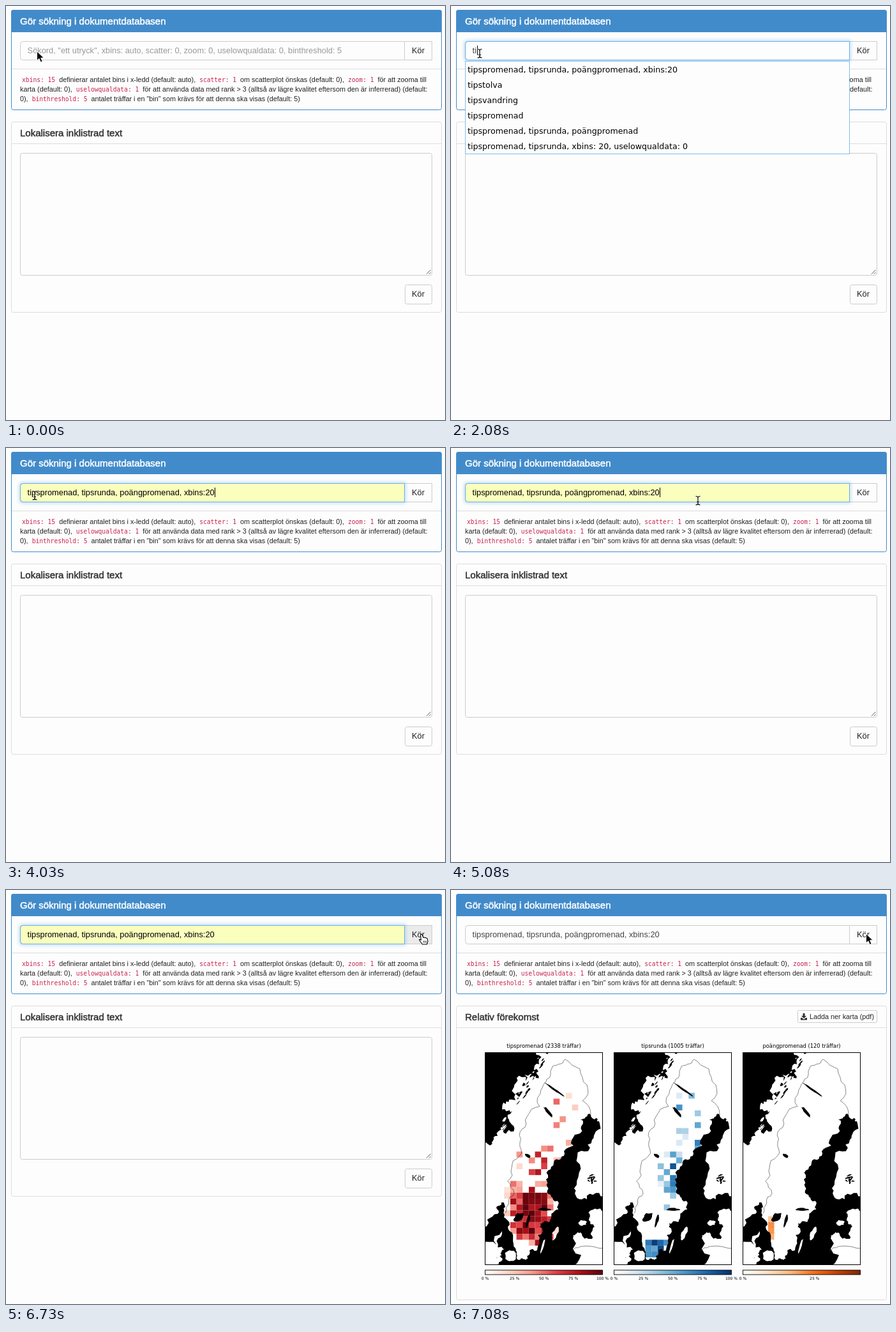
An HTML page for the animation above (8 s loop, 688x648 px).

```html
<!DOCTYPE html>
<html lang="sv">
<head>
<meta charset="utf-8">
<title>Dokumentdatabasen</title>
<style>
html, body { margin: 0; width: 100%; height: 100%; overflow: hidden; background: #fdfdfd; }
svg { display: block; }
text { font: 12.84px "Liberation Sans", Arial, sans-serif; fill: #222; white-space: pre; }
.head { font-size: 15px; fill: #333; stroke: #333; stroke-width: .5px; }
.head.light { fill: #fff; stroke: #fff; }
.help { font-size: 10.82px; }
.code { font: 9.65px "DejaVu Sans Mono", monospace; fill: #c7254e; }
.list { font: 12.62px "DejaVu Sans", sans-serif; fill: #000; }
.kwic { font: 10.35px "DejaVu Sans Mono", monospace; fill: #000; }
.kwic .b { font-weight: bold; }
.title { font: 8.32px "DejaVu Sans", sans-serif; fill: #000; text-anchor: middle; }
.tick { font: 6px "DejaVu Sans", sans-serif; fill: #000; text-anchor: middle; }
.box { fill: #fdfdfd; stroke: #ccc; }
.panel { fill: #fdfdfd; stroke: #ddd; }
.rule { stroke: #ddd; }
.cell { mix-blend-mode: multiply; }
</style>
</head>
<body>
<svg id="stage" width="688" height="648" viewBox="0 0 688 648"></svg>
<script>
const stage = document.getElementById('stage');

function el(tag, attrs = {}, parent = stage, content) {
  const node = document.createElementNS('http://www.w3.org/2000/svg', tag);
  for (const k in attrs) node.setAttribute(k, attrs[k]);
  if (content !== undefined) node.textContent = content;
  parent.appendChild(node);
  return node;
}
const group = (parent = stage) => el('g', {}, parent);
const text = (x, y, s, cls = '', parent = stage) => el('text', { x, y, class: cls }, parent, s);
const rect = (x, y, width, height, more = {}, parent = stage) => el('rect', { x, y, width, height, ...more }, parent);
const path = (d, more = {}, parent = stage) => el('path', { d, ...more }, parent);
const show = (node, on) => { node.style.display = on ? '' : 'none'; };

function panel(y, h, title, parent) {
  rect(8.5, y + .5, 674, h, { class: 'panel', rx: 3 }, parent);
  path(`M9 ${y + 34.5}H682`, { class: 'rule' }, parent);
  text(22, y + 23, title, 'head', parent);
}

// Search panel
rect(8.5, 6.5, 674, 156, { rx: 3, fill: '#fdfdfd', stroke: '#428bca' });
path('M8 41V10q0-4 4-4H679q4 0 4 4V41Z', { fill: '#428bca' });
text(22, 29, 'Gör sökning i dokumentdatabasen', 'head light');
path('M9 98.5H682', { class: 'rule' });
[
  '`xbins: 15` definierar antalet bins i x-ledd (default: auto), `scatter: 1` om scatterplot önskas (default: 0), `zoom: 1` för att zooma till',
  'karta (default: 0), `uselowqualdata: 1` för att använda data med rank > 3 (alltså av lägre kvalitet eftersom den är inferrerad) (default:',
  '0), `binthreshold: 5` antalet träffar i en "bin" som krävs för att denna ska visas (default: 5)'
].forEach((s, i) => {
  const t = text(22, 119 + 15 * i, '', 'help');
  s.split('`').forEach((part, k) => el('tspan', k % 2 ? { class: 'code', dx: 3 } : { dx: k ? 3 : 0 }, t, part));
});

// Search field and button
const button = rect(624.5, 55.5, 43, 29, { class: 'box' });
text(636, 74, 'Kör');
const shape = 'M624.5 55.5H26.5q-4 0-4 4V80.5q0 4 4 4H624.5Z';
const glow = path(shape, { fill: 'none', stroke: '#66afe9', 'stroke-width': 4, style: 'filter:blur(2.5px)' });
const field = path(shape, { class: 'box' });
const ring = path(shape, { fill: 'none', stroke: '#66afe9' });
const selection = rect(54, 62, 273, 15, { fill: '#b2d3ee' });
const typed = text(33.6, 74, '');
const caret = rect(0, 62, 1, 15, { fill: '#000' });

// Paste panel
const paste = group();
panel(181, 298, 'Lokalisera inklistrad text', paste);
rect(22.5, 230.5, 645, 191, { class: 'box', rx: 3 }, paste);
path('M659 419.5l6.5-6.5M663 419.5l2.5-2.5', { stroke: '#555' }, paste);
rect(625.5, 436.5, 42, 30, { class: 'box', rx: 3 }, paste);
text(636, 455, 'Kör', '', paste);

// Suggestions
const menu = group();
rect(22.5, 86.5, 602, 145, { fill: '#fdfdfd', stroke: '#85bce6' }, menu);
const picked = rect(23, 87, 601, 24, { fill: '#b3d3fe' }, menu);
const query = 'tipspromenad, tipsrunda, poängpromenad, xbins:20';
[
  query, 'tipstolva', 'tipsvandring', 'tipspromenad',
  'tipspromenad, tipsrunda, poängpromenad', 'tipspromenad, tipsrunda, xbins: 20, uselowqualdata: 0'
].forEach((s, i) => text(26, 104 + 24 * i, s, 'list', menu));

// Result panel, short or tall
function resultPanel(h) {
  const g = group();
  panel(181, h, 'Relativ förekomst', g);
  rect(543.5, 188.5, 124, 19, { class: 'box', rx: 1 }, g);
  path('M551.5 193h3v4h2.5l-4 4-4-4h2.5ZM548 200h2l3 2.5 3-2.5h2v3.5h-10Z', { fill: '#333' }, g);
  text(562, 202, 'Ladda ner karta (pdf)', 'help', g);
  return g;
}

// Keyword in context
const hits = resultPanel(62);
panel(262, 420, 'KWIC - poängpromenad (50 första)', hits);
const labels = { m: '[molnrad] ', v: '[verkbod] ', t: '[tusk] ' };
// "~" stands for the keyword, stars enclose bold text
[
  'm|ansiktet! i morse gick vi *~* i ett vittsippslandskap och på väg hem plocka',
  'v|krev:det var roligt...men *~???wtf* ?hahaha, var det *~?fan,* jag',
  'v|krev:det var roligt...men *~???wtf* ?ja.. nåt fel med det eller?ja men ja t',
  'v|kanske skall hoppa över *"~"* !?!? hitta på något annat? folk tyckte det v',
  't|g mest softat och vart på *~* (och läkarn sa att jag skulle vila knät, ta d',
  'v|inte har bil, vill oxå gå *~* med bilen',
  'm|ater med picnic. det blev *~/tipspromenad,* vin, öl, brännis och lekar. rät',
  'm|ille se, men det fanns en *~* som gick ut på att ungarna skulle hitta gårds',
  'm|nea och lova<3 vi hade *~* jag linnea adde och lova hade den, det var jä',
  'm|inne. idag har det varit *~* i den lilla staden. en av frågorna satt preci',
  'm|fast denna gång blev det *~* i högsbo. får väl se om någon av oss vinner :',
  'm|*~* i kallsolen. 1: varbergs stad firar i år 200',
  'm|jag blev :-) igår gick vi *~* i ruddalen det var också härligt och väl värt',
  'm|r på tuvlufsen. det är en *~* som almvika bfk ordnar. min farfar är grundar',
  'm|på flatön, vilket innebär *~* + hälsa på eva och torre. vi lyckades fuska',
  'm|kte och grillade. det var *~,* sopbubblor och gos med kaniner. hur mysigt s',
  'm|ndlades till herr lund... *~* och goda häxan och elaka häxan... jag hoppas',
  'm|ska så är det en förlorad *~.* ny fas eller kulmen på den som pågår? en vis',
  'm|! bland annat blev det en *~* med temat på födelsedagsbarnet och hur väl vi'
].forEach((row, i) => {
  const t = text(i ? 22.5 : 25, 324 + 18 * i, '', 'kwic', hits);
  const parts = (labels[row[0]] + row.slice(2)).replaceAll('~', 'poängpromenad').split('*');
  parts.forEach((s, k) => el('tspan', k % 2 ? { class: 'b' } : {}, t, s));
});

// Maps: a few key points, roughened into coastlines
const maps = resultPanel(460);
let seed = 11;
const rnd = () => (seed = (seed * 16807) % 2147483647) / 2147483647;

function split(a, b, depth, amp) {
  if (!depth) return [b];
  const dx = b[0] - a[0], dy = b[1] - a[1], k = (rnd() - .5) * amp;
  const m = [(a[0] + b[0]) / 2 - dy * k, (a[1] + b[1]) / 2 + dx * k];
  return [...split(a, m, depth - 1, amp), ...split(m, b, depth - 1, amp)];
}
function rough(keys, depth, amp) {
  const p = keys.trim().split(/\s+/).map(s => s.split(',').map(Number));
  const out = p.flatMap((q, i) => i ? split(p[i - 1], q, depth, amp) : [q]);
  return 'M' + out.map(q => q.map(v => v.toFixed(1))).join('L');
}
function blob(x, y, w, h, turn, fill) {
  let d = '';
  for (let a = 0; a < 6.28; a += .45) {
    const r = .4 + rnd() * .25;
    d += (d ? 'L' : 'M') + [w * r * Math.cos(a), h * r * Math.sin(a)];
  }
  path(d + 'Z', { fill, transform: `translate(${x} ${y}) rotate(${turn})` }, land);
}

const defs = el('defs');
rect(0, 0, 184, 332, {}, el('clipPath', { id: 'frame' }, defs));
const land = el('g', { id: 'land', 'clip-path': 'url(#frame)' }, defs);
rect(0, 0, 184, 332, { fill: '#fff' }, land);

const ocean = '-5,-5 100,-5 78,20 64,44 48,74 36,102 20,130 -5,160';
const baltic = `-5,277 20,252 26,234 31,253 39,279 49,310 52,324 64,324 70,310 82,309 91,280 92,265 104,258 115,238
  100,221 96,198 108,172 124,154 141,128 150,104 166,97 180,110 168,136 145,162 140,212 160,229 190,225
  190,243 163,249 163,262 172,272 168,291 150,281 138,290 134,340 20,340 18,320 30,308 27,279 -5,300`;
path(rough(ocean, 4, 1.15) + rough(baltic, 3, .7), { fill: '#000' }, land);
const border = '32,251 46,220 42,180 55,140 66,100 88,58 105,24 126,10 160,50 166,97';
path(rough(border, 3, .45) + rough('136,310 150,303 190,306', 2, .3), { fill: 'none', stroke: '#555', 'stroke-width': .7 }, land);

// Islands, then lakes
blob(110, 283, 7, 20, 25, '#fff');
blob(91, 301, 3, 22, 15, '#fff');
blob(40, 318, 15, 18, 0, '#fff');
blob(23, 323, 9, 8, 0, '#fff');
blob(153, 266, 13, 8, -10, '#fff');
blob(53, 257, 16, 10, -40, '#000');
blob(68, 262, 4, 20, 15, '#000');
blob(93, 245, 20, 4, 0, '#000');
blob(67, 161, 8, 5, 30, '#000');
blob(110, 58, 34, 3, 35, '#000');
blob(99, 92, 20, 4, 50, '#000');
for (let i = 0; i < 9; i++) blob(162 + rnd() * 14, 186 + rnd() * 20, 3 + rnd() * 6, 2, rnd() * 180, '#000');
// Skerries and fjords along the ocean
for (let i = 0; i < 36; i++) {
  const u = rnd(), x = 92 - 88 * u + (rnd() - .5) * 14;
  blob(x, 150 * u ** .85, 2 + rnd() * 9, 1 + rnd() * 3, -50, i % 2 ? '#fff' : '#000');
}

const hex = c => [1, 3, 5].map(i => parseInt(c.slice(i, i + 2), 16));
function ramp(stops, v) {
  const p = v * (stops.length - 1), i = Math.min(stops.length - 2, Math.floor(p));
  const a = hex(stops[i]), b = hex(stops[i + 1]);
  return `rgb(${a.map((c, k) => Math.round(c + (b[k] - c) * (p - i)))})`;
}

// Hot spots: centre, radii and density of the found words
[
  {
    title: 'tipspromenad (2338 träffar)', span: 100,
    stops: ['#ffffff', '#fdd5c6', '#f79a8c', '#e04045', '#ad1119', '#60000c'],
    hot: [[74, 252, 34, 48, 1.25], [82, 175, 32, 24, .5], [125, 100, 22, 60, .1]]
  },
  {
    title: 'tipsrunda (1005 träffar)', span: 100,
    stops: ['#ffffff', '#d3e4f3', '#8fc2de', '#4a97c9', '#1764ab', '#08306b'],
    hot: [[92, 198, 15, 42, .8], [66, 306, 18, 13, 1.1], [122, 105, 18, 55, .3]]
  },
  {
    title: 'poängpromenad (120 träffar)', span: 41,
    stops: ['#ffffff', '#fee3c8', '#fdb97d', '#f3701b', '#c44103', '#7f2704'],
    hot: [[46, 276, 7, 16, 1]]
  }
].forEach((m, i) => {
  const g = el('g', { transform: `translate(${53 + 202 * i} 255)`, style: 'isolation:isolate' }, maps);
  el('use', { href: '#land' }, g);
  for (let y = 34.8; y < 322; y += 9.2) {
    for (let x = 30.2; x < 145; x += 9.68) {
      const p = Math.max(...m.hot.map(([cx, cy, rx, ry, n]) =>
        n * Math.exp(-(((x + 5 - cx) / rx) ** 4) - ((y + 5 - cy) / ry) ** 4)));
      if (rnd() < p) rect(x, y, 9.6, 9.2, { class: 'cell', fill: ramp(m.stops, Math.min(1, p * .4 + rnd() * .6)) }, g);
    }
  }
  rect(.5, -.5, 184, 332, { fill: 'none', stroke: '#000' }, g);
  text(92.5, -8, m.title, 'title', g);

  const grad = el('linearGradient', { id: 'bar' + i }, defs);
  m.stops.forEach((c, k) => el('stop', { offset: k / (m.stops.length - 1), 'stop-color': c }, grad));
  rect(.5, 340, 184, 7, { fill: `url(#bar${i})`, stroke: '#000', 'stroke-width': .9 }, g);
  for (let p = 0; p <= m.span; p += 25) text(.5 + 184 * p / m.span, 355, p + ' %', 'tick', g);
});

// Pointers, each with its hot spot at 0,0
const pointers = { arrow: group(), beam: group(), hand: group() };
path('M0 0V14.5L3.4 11.3 6 17 8.6 15.9 6.2 10.3H10.8Z', { fill: '#000', stroke: '#fff' }, pointers.arrow);
const beam = 'M-3.5-6.5Q0-6.5 0-4.5V5Q0 7-3.5 7M3.5-6.5Q0-6.5 0-4.5V5Q0 7 3.5 7M-2 2.5H2';
path(beam, { fill: 'none', stroke: '#fff', 'stroke-width': 2.6, opacity: .7 }, pointers.beam);
path(beam, { fill: 'none', stroke: '#000', 'stroke-width': 1.2 }, pointers.beam);
path('M-1 1.5q1.5-1.5 2.7.2L3.5 6q1.5-1 2.3.2 1.6-.7 2.2.6 1.8-.3 2 1.7L10.5 12 9 16.500H2L-2 11q-1.5-1.8 0-2.4l2 1.2Z',
  { fill: '#fff', stroke: '#000', 'stroke-width': 1.1, 'stroke-linejoin': 'round' }, pointers.hand);
path('M3.8 11v3M5.8 11v3M7.8 11v3', { stroke: '#000', 'stroke-width': .8 }, pointers.hand);

// Timing
const hint = 'Sökord, "ett utryck", xbins: auto, scatter: 0, zoom: 0, uselowqualdata: 0, binthreshold: 5';
const focusAt = 1190, keys = [1780, 2080, 2230, 2380], suggestAt = 1930;
const pickAt = 3280, selectAt = 3430, acceptAt = 4030, hoverAt = 5980, pressAt = 6280, releaseAt = 6580;
const loadAt = 6930, mapAt = 7080;
const route = [
  [0, 48.5, 71], [279, 48.5, 71], [280, 57, 80], [430, 41, 78], [580, 45, 74],
  [4630, 45, 74], [5080, 387, 82], [5530, 564, 131], [hoverAt, 650.5, 68.5]
];

// The pointer is seen only every 150 ms
function pointerAt(t) {
  const held = Math.max(0, Math.floor((t - 130) / 150) * 150 + 130);
  const i = route.findIndex(k => k[0] > held);
  if (i < 0) return route[route.length - 1].slice(1);
  const [t0, x0, y0] = route[i - 1], [t1, x1, y1] = route[i], u = (held - t0) / (t1 - t0);
  return [x0 + (x1 - x0) * u, y0 + (y1 - y0) * u];
}
const blink = (t, since) => t < since || Math.floor((t - since) / 450) % 2 === 0;

function draw(t) {
  const count = keys.filter(k => k <= t).length;
  const filled = t >= pickAt, loaded = t >= loadAt, previewing = filled && t < acceptAt;
  const focus = t < focusAt || loaded ? 0 : Math.min(1, .4 + (t - focusAt) / 400);

  typed.textContent = filled ? query : count ? query.slice(0, count) : hint;
  typed.style.fill = filled && !loaded ? '#000' : count ? '#444' : '#999';
  field.style.fill = filled && !loaded ? '#faffbd' : '#fdfdfd';
  glow.style.opacity = focus * .45;
  ring.style.opacity = focus;
  button.style.fill = t < hoverAt || loaded ? '#fdfdfd' : t >= pressAt && t < releaseAt ? '#e4e4e4' : '#ebebeb';

  const accepted = t >= acceptAt;
  const since = accepted ? acceptAt + 150 : count ? keys[count - 1] : focusAt;
  const end = accepted ? 327 : [34, 37, 41, 48, 55][count];
  caret.setAttribute('x', end);
  show(caret, focus && blink(t, since) && !(t >= selectAt && !accepted));
  show(selection, previewing && t >= selectAt);
  show(menu, t >= suggestAt && !accepted);
  show(picked, previewing);
  show(paste, !loaded);
  show(hits, loaded && t < mapAt);
  show(maps, t >= mapAt);

  const [x, y] = pointerAt(t);
  const inRow = y > 55 && y < 85;
  const kind = t < 280 || loaded || !inRow ? 'arrow' : x > 625 ? 'hand' : 'beam';
  for (const k in pointers) show(pointers[k], k === kind);
  pointers[kind].setAttribute('transform', `translate(${x} ${y})`);
}

const start = performance.now();
function tick() {
  draw((performance.now() - start) % 8000);
  requestAnimationFrame(tick);
}
tick();
</script>
</body>
</html>
```
